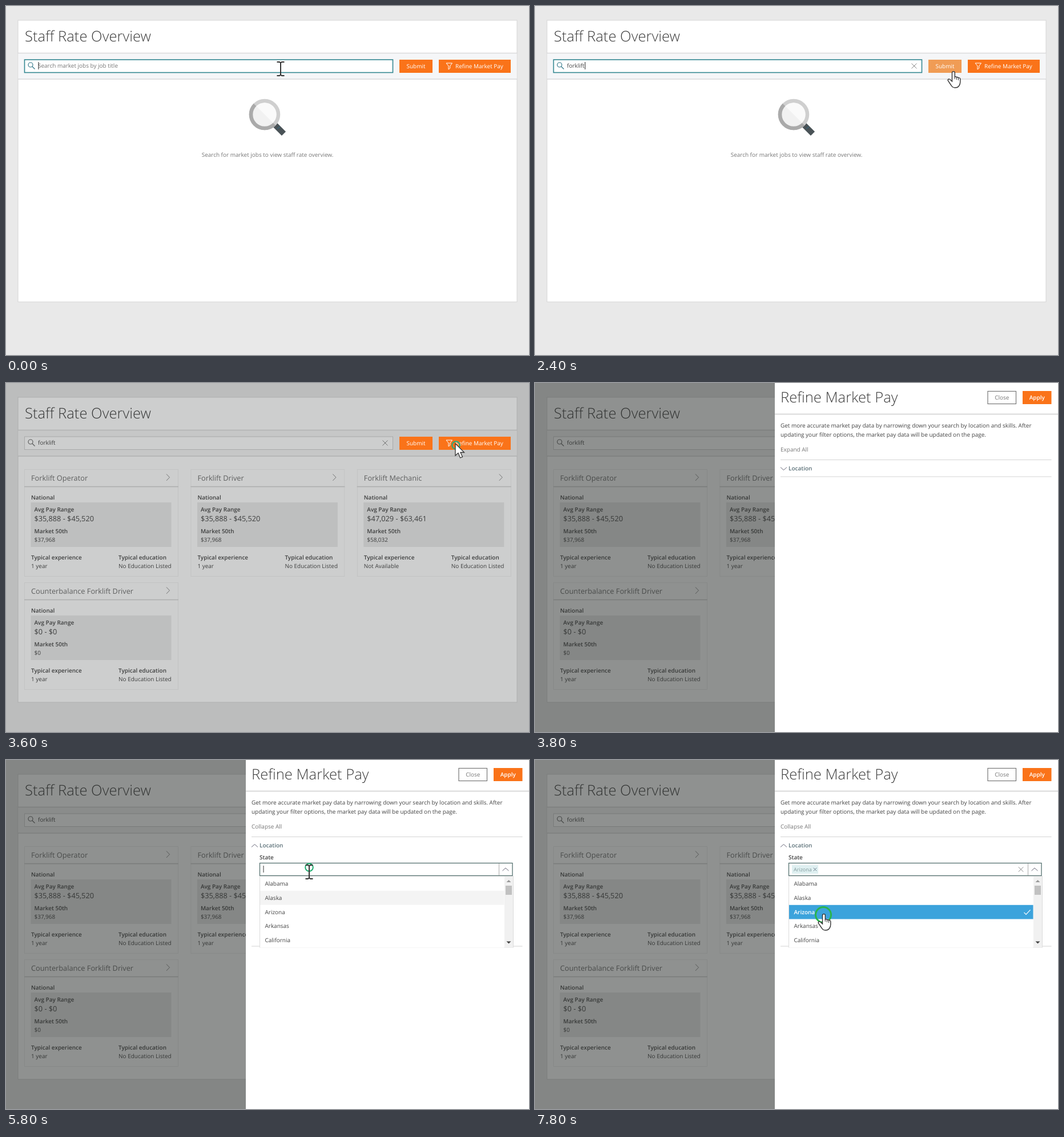
These frames come from a looping animation (916x611 px, 8000 ms). An HTML page:

```html
<!DOCTYPE html>
<html lang="en">
<head>
<meta charset="utf-8">
<title>Staff Rate Overview</title>
<style>
  html, body { margin: 0; width: 100%; height: 100%; overflow: hidden; background: #e9e9e9; }
  svg { display: block; width: 916px; height: 611px; }
  text { font-family: "Open Sans", "Noto Sans", sans-serif; font-size: 9.97px; fill: #444; text-rendering: geometricPrecision; }
  .h1 { font-size: 25.6px; font-weight: 300; fill: #3c3c3c; }
  .mid { font-size: 12.75px; }
  .teal { fill: #447a7e; }
  .b { font-weight: 600; }
  .dim { fill: #777; }
  .white { fill: #fff; }
  .c { text-anchor: middle; }
  .gray { filter: grayscale(1); }
</style>
</head>
<body>
<svg id="stage" viewBox="0 0 916 611"></svg>
<script>
const LOOP = 8000, STEP = 200;
const stage = document.getElementById('stage');
const ORANGE = '#fa7319';
const QUERY = 'forklift';
const STATES = ['Alabama', 'Alaska', 'Arizona', 'Arkansas', 'California'];
const CARDS = [
  ['Forklift Operator', '$35,888 - $45,520', '$37,968', '1 year'],
  ['Forklift Driver', '$35,888 - $45,520', '$37,968', '1 year'],
  ['Forklift Mechanic', '$47,029 - $63,461', '$58,032', 'Not Available'],
  ['Counterbalance Forklift Driver', '$0 - $0', '$0', '1 year']
];
// start time, pointer, x, y
const POINTER = [
  [0, 'beam', 481, 110], [1800, 'beam', 520, 112], [2000, 'beam', 610, 114],
  [2200, 'hand', 712, 114], [2400, 'hand', 733, 115], [3000, 'arrow', 752, 111],
  [3200, 'arrow', 779, 107], [3400, 'arrow', 787, 106], [3800, 'none', 0, 0],
  [4000, 'arrow', 690, 130], [4200, 'arrow', 570, 142], [4400, 'hand', 478, 148],
  [4600, 'hand', 465, 150], [5000, 'arrow', 490, 165], [5200, 'beam', 518, 188],
  [5400, 'beam', 531, 196], [6200, 'hand', 531, 222], [6400, 'hand', 526, 236],
  [6600, 'hand', 519, 250], [6800, 'hand', 511, 263], [7000, 'hand', 506, 270]
];
// click time, x, y, colour
const CLICKS = [
  [2600, 733, 116, '#20ad80'], [3400, 788, 109, '#20ad80'], [4600, 465, 151, '#20ad70'],
  [5600, 531, 188, '#20ad70'], [7800, 505, 271, '#2bb54c']
];

const pen = document.createElement('canvas').getContext('2d');
const widthOf = s => { pen.font = '10px "Open Sans", "Noto Sans", sans-serif'; return pen.measureText(s).width; };

const text = (x, y, s, cls = '') => `<text x="${x}" y="${y}" class="${cls}">${s}</text>`;
const box = (x, y, w, h, fill, stroke = 'none', sw = 1) =>
  `<rect x="${x}" y="${y}" width="${w}" height="${h}" fill="${fill}" stroke="${stroke}" stroke-width="${sw}"/>`;
const line = (d, color = '#d6d6d6', w = 1) =>
  `<path d="${d}" fill="none" stroke="${color}" stroke-width="${w}"/>`;
const cross = (x, y, r, color = '#888') =>
  line(`M${x - r} ${y - r}l${2 * r} ${2 * r}m0 ${-2 * r}l${-2 * r} ${2 * r}`, color);
const chevron = (x, y, dir, color = '#667') => line(`M${x - 5.5} ${y - 2.5 * dir}l5.5 ${5 * dir}l5.5 ${-5 * dir}`, color);

const pointers = {
  none: () => '',
  beam: () => line('M-6.5 -12H-2L0 -10.5L2 -12H6.5M0 -10.5V10.5M-6.5 12H-2L0 10.5L2 12H6.5', '#333', 2),
  arrow: () => '<path d="M0 0V21L5 16.5L8.5 25L12.5 23.3L9 15.5H15.5Z" fill="#fff" stroke="#333" stroke-width="1.3"/>',
  hand: () => '<path d="M-2.5 2a2.4 2.4 0 0 1 4.8 0V9q2-1 3.2.8q2-.8 3 .9q3-.5 3.3 2.3V18q0 3.5-2 6.5Q7 28.5 2 28Q-1.5 28-4 24L-9.5 16q-1-2 1-3q1.5-.4 3 1.2L-2.5 17Z" fill="#fff" stroke="#333" stroke-width="1.4"/>'
    + line('M2.3 9V13M5.5 10V14M8.5 11V15', '#333')
};

function magnifier() {
  return line('M469 206L474 211', '#b5b5b5', 5)
    + line('M471.5 208.5L486.5 223.5', '#4a5357', 10)
    + line('M475 215L480 211', '#2f6f8c', 1)
    + '<circle cx="453" cy="190" r="24" fill="#f1f1f1" stroke="#cfcfcf" stroke-width="6.5"/>'
    + '<path d="M438.5 175.5A20.5 20.5 0 0 1 467.5 204.5Z" fill="#fafafa"/>'
    + line('M436 173A24 24 0 0 0 470 207', '#aaa', 6.5);
}

function card([title, range, median, years], i) {
  const x = 32 + 291.4 * (i % 3), y = 151 + 198 * Math.floor(i / 3);
  const at = (dx, dy, s, cls) => text(x + dx, y + dy, s, cls);
  return box(x + .5, y + .5, 269, 187, '#fff', '#f0f0f0')
    + line(`M${x} ${y + 30.5}h270`, '#d4d4d4', 1.3)
    + line(`M${x + 249} ${y + 8.5}l5.5 5.7l-5.5 5.7`, '#888')
    + box(x + 11.5, y + 58, 246, 78, '#ebebeb')
    + at(12, 19.5, title, 'mid teal')
    + at(12, 52.5, 'National', 'b')
    + at(17.5, 73.5, 'Avg Pay Range', 'b')
    + at(17.5, 91.2, range, 'mid')
    + at(17.5, 111.5, 'Market 50th', 'b')
    + at(17.5, 127.3, median)
    + at(12, 157.6, 'Typical experience', 'b')
    + at(12, 173, years)
    + at(165, 157.6, 'Typical education', 'b')
    + at(165, 173, 'No Education Listed');
}

function page(t) {
  const found = t >= 2800;
  const typed = QUERY.slice(0, Math.round(t / 150));
  const caret = 57 + widthOf(typed);
  return box(0, 0, 916, 611, '#e9e9e9')
    + box(21, 25, 874, found ? 534 : 493, '#fff', '#d6d6d6')
    + box(21.5, 82, 873, 46, '#f5f6f8')
    + line('M21 82.5H895M21 128H895', '#d9d9db', 1.4)
    + text(33, 61.5, 'Staff Rate Overview', 'h1')
    + box(32.5, 94, 645, 22.5, '#fff', found ? '#cfcfcf' : '#338791', found ? 1 : 1.6)
    + '<circle cx="43" cy="103" r="4" fill="none" stroke="#35798a" stroke-width="1.2"/>'
    + line('M46 106L50.5 110.5', '#35798a', 1.3)
    + (typed ? text(56, 108, typed) + cross(664, 105, 4.5) : text(56, 108, 'Search market jobs by job title', 'dim'))
    + (found ? '' : line(`M${caret} 98V111`, '#222'))
    + (found ? CARDS.map(card).join('')
      : magnifier() + text(458, 263.5, 'Search for market jobs to view staff rate overview.', 'c dim'));
}

function buttons(t) {
  const pale = t >= 2400 && t < 2800;
  return box(689, 94, 58, 23, pale ? '#f09c55' : ORANGE)
    + text(718, 108.7, 'Submit', 'c white')
    + box(758, 94, 126, 23, ORANGE)
    + (t === 3400 ? box(757, 92.5, 128.5, 26, 'none', '#4b5058', 2) : '')
    + line('M771 100H781.5L777.7 105V109L775 111V105Z', '#fff')
    + text(787, 108.7, 'Refine Market Pay', 'white');
}

function dropdown(t) {
  const picked = t >= 7800, hover = t < 6600 ? 1 : 2;
  const row = (name, i) => {
    const y = 204 + 24.9 * i, on = picked && i === 2;
    const fill = on ? '#3ca3dc' : i === hover ? '#f4f4f4' : '#fff';
    return box(445, y, 427.5, 24.9, fill)
      + text(453.5, y + 15.7, name, on ? 'b white' : '')
      + (on ? line(`M856.5 ${y + 13}l3.5 3.5l7.5-8`, '#fff', 1.2) : '');
  };
  return box(444.5, 203.5, 444, 124.5, '#fff', '#dcdcdc')
    + STATES.map(row).join('')
    + box(873, 204, 15, 124, '#f1f1f1')
    + box(875, 220, 11, 16, '#c1c1c1')
    + '<path d="M876.5 214L880.5 210L884.5 214Z" fill="#999"/><path d="M876.5 317.5L880.5 321.5L884.5 317.5Z" fill="#444"/>';
}

function stateField(t) {
  const open = t >= 5600, picked = t >= 7800;
  return text(444, 174.3, 'State', 'b')
    + box(444.5, 180.5, 442.5, 22, '#fff', open ? '#54716f' : '#bbb', open ? 1.3 : 1)
    + line('M863.5 181V202', '#aaa')
    + chevron(875, 191.5, open ? -1 : 1)
    + (open ? dropdown(t) : '')
    + (open && !picked ? line('M451 185V197', '#333') : '')
    + (picked ? box(450, 184, 46, 15, '#dff0f1')
      + '<text x="453" y="194.8" style="font-size:9px;fill:#829a9c">Arizona</text>'
      + cross(490.5, 191.5, 2.7, '#678') + cross(851, 191.5, 4.2) : '');
}

function drawer(t) {
  const wide = t >= 4800;
  return box(420, 0, 496, 611, '#fff')
    + text(430, 33.5, 'Refine Market Pay', 'h1')
    + box(793, 14.5, 49.5, 22, '#fff', '#777', 1.2)
    + text(817.8, 29.2, 'Close', 'c dim')
    + box(854, 14, 50.5, 23, ORANGE)
    + text(879.2, 29.2, 'Apply', 'c b white')
    + line('M420 54.5H916', '#cfcfcf', 1.3)
    + text(430, 77.5, 'Get more accurate market pay data by narrowing down your search by location and skills. After')
    + text(430, 93.7, 'updating your filter options, the market pay data will be updated on the page.')
    + text(430, 120, wide ? 'Collapse All' : 'Expand All', 'dim')
    + line(`M430 134.5H904.5M430 ${wide ? 326 : 164}H904.5`, '#d4d4d4')
    + chevron(435.5, 150, wide ? -1 : 1)
    + '<text x="444" y="153.4" class="b" style="fill:#5b7078">Location</text>'
    + (wide ? stateField(t) : '');
}

function clickRing(t) {
  const hit = CLICKS.find(c => t >= c[0] && t < c[0] + 2 * STEP);
  if (!hit) return '';
  const [start, x, y, color] = hit, fresh = t === start;
  return `<circle cx="${x}" cy="${y}" r="${fresh ? 13.5 : 6.8}" fill="none" stroke="${color}" stroke-width="${fresh ? 3 : 2}"/>`;
}

function pointer(t) {
  const [, kind, x, y] = POINTER.filter(p => p[0] <= t).pop();
  return `<g transform="translate(${x} ${y})">${pointers[kind]()}</g>`;
}

function scene(t) {
  const shade = t < 3600 ? 0 : t < 3800 ? .23 : .52;
  return `<g class="${shade ? 'gray' : ''}">${page(t)}</g>`
    + (shade ? `<rect width="916" height="611" fill="#2a2c2b" opacity="${shade}"/>` : '')
    + buttons(t)
    + (t >= 3800 ? drawer(t) : '')
    + clickRing(t) + pointer(t);
}

let shown = -1;
const begin = performance.now();
function tick() {
  const t = Math.floor(((performance.now() - begin) % LOOP) / STEP) * STEP;
  if (t !== shown) stage.innerHTML = scene(shown = t);
  requestAnimationFrame(tick);
}
tick();
</script>
</body>
</html>
```
